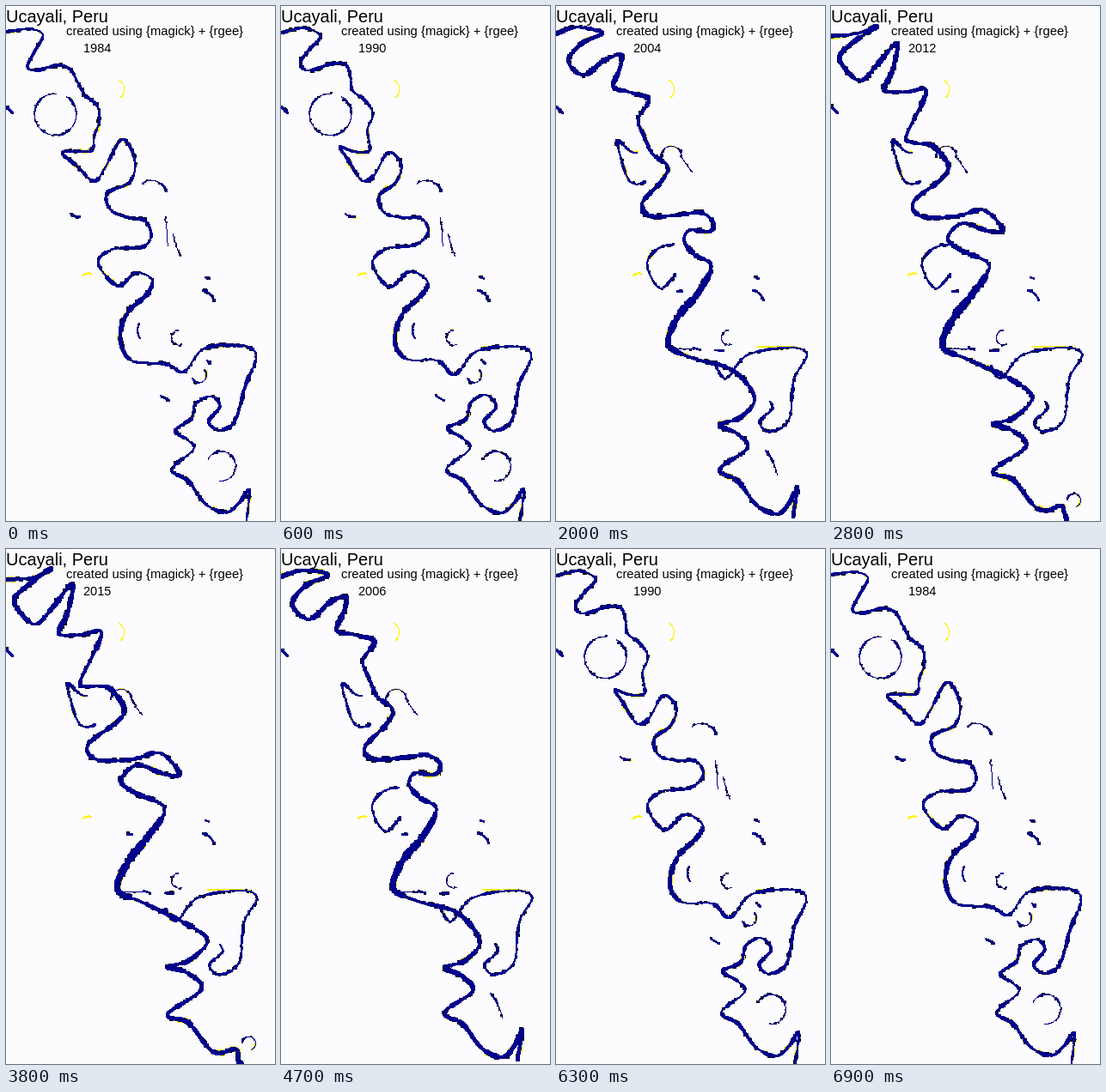
An HTML page with a canvas for the animation above (7 s loop, 313x600 px).

```html
<!DOCTYPE html>
<html lang="en">
<head>
<meta charset="utf-8">
<title>Ucayali, Peru</title>
<style>
html, body { margin: 0; width: 313px; height: 600px; overflow: hidden; background: #fcfcff; }
canvas, svg { position: absolute; left: 0; top: 0; }
text { font-family: "Liberation Sans", Arial, sans-serif; fill: #000; }
</style>
</head>
<body>
<canvas id="map" width="313" height="600"></canvas>
<svg width="313" height="600">
  <text x="0" y="19" font-size="20">Ucayali, Peru</text>
  <text x="70" y="34" font-size="14.8">created using {magick} + {rgee}</text>
  <text id="year" x="90" y="54" font-size="14.6">1984</text>
</svg>
<script>
const FIRST = 1984, LAST = 2018, STEP = 100;
const NAVY = '#00008b', YELLOW = '#fff200', BLACK = '#000020';
const ctx = document.getElementById('map').getContext('2d');
const label = document.getElementById('year');

// Bends of each reach, north to south. Equal counts drift; a change of count is a cutoff.
const reaches = [
  {
    1984: '0,30 28,27 43,34 32,55 25,71 36,75 60,69 75,74 84,90 92,104 106,116 108,136 103,150',
    1997: '0,33 25,24 49,36 33,47 19,62 28,76 55,66 76,62 77,78 73,92 88,103 106,114 98,138',
    2006: '0,32 25,25 55,30 30,42 13,64 33,82 57,62 76,56 72,76 65,95 90,101 109,108 95,130',
    2012: '0,35 30,32 53,24 25,43 10,62 33,87 54,68 77,43 72,74 62,98 88,100 111,100 88,150'
  }, {
    1984: '100,168 82,169 65,171 82,186 102,204 115,189 135,155 150,180',
    1997: '106,169 88,170 72,156 74,172 85,203 101,206 112,189 128,189',
    2006: '103,152 112,172 130,187',
    2012: '95,159 118,163 136,185'
  }, {
    1984: '144,205 118,218 122,238 145,247 162,250 169,268',
    1997: '121,207 110,224 118,244 140,246 165,244 174,258',
    2006: '122,205 98,230 105,244 135,244 170,240 186,252',
    2012: '129,201 96,228 105,245 145,245 178,238 200,261'
  }, {
    1984: '158,281 125,283 107,299 130,326 151,311 170,319',
    1997: '152,276 120,282 106,302 122,329 147,307 170,322',
    2006: '178,263 156,261 149,274 162,290 181,303',
    2012: '182,262 153,253 136,270 150,284 184,302'
  }, {
    wide: 1.4,
    1984: '164,336 141,358 133,388',
    2012: '165,335 142,364 130,397'
  }, {
    1984: '146,413 186,417 207,426 231,399 275,396 291,408 278,444 266,484 248,494 236,484 249,466 238,455 220,464 216,480 197,495',
    1997: '146,409 178,409 197,434 222,407 270,398 292,406 277,435 271,482 248,496 237,484 252,468 238,451 221,461 214,483 190,488',
    2006: '158,410 205,424 231,456 215,479 190,488',
    2012: '160,412 213,437 234,457 212,480 188,487'
  }, {
    1984: '212,506 218,517 193,540 212,553 232,580 256,590 272,578 283,564 280,600',
    2006: '210,497 223,515 190,540 212,554 234,582 258,592 272,578 281,560 275,595',
    2012: '210,494 227,513 188,542 212,552 235,581 250,588 268,582 272,592 275,600'
  }
];

// Lakes as arcs: x, y, length, heading, turn (degrees)
const lakes = [
  { from: 1984, to: 1990, arcs: [[58, 102, 140, 180, -330], [158, 207, 36, -35, 110], [185, 246, 34, 80, 10],
    [194, 265, 28, 75, -5], [155, 370, 18, 115, -60], [180, 454, 11, 30, 0], [235, 528, 75, -60, 250], [217, 434, 30, 60, -200]] },
  { from: 1984, to: 2001, arcs: [[75, 242, 12, 45, -60], [234, 413, 5, 45, 0]] },
  { from: 1984, to: 2018, arcs: [[229, 331, 18, 15, 60], [200, 378, 30, 170, -200], [232, 316, 5, 20, 0], [0, 117, 11, 45, 0]] },
  { from: 1991, to: 2018, arcs: [[122, 175, 38, -85, 180], [145, 174, 24, 60, -10], [141, 332, 6, 0, 0]] },
  { from: 1991, to: 2009, arcs: [[244, 518, 32, 50, 30]] },
  { from: 2002, to: 2018, arcs: [[160, 398, 8, 20, 0], [185, 401, 10, 0, 0], [133, 400, 28, -5, 10]] },
  { from: 2010, to: 2018, arcs: [[275, 575, 34, -80, 250]] },
  { from: 1984, to: 2018, color: YELLOW, arcs: [[131, 86, 24, 30, 110], [90, 314, 10, -40, 60], [235, 397, 50, -2, 5]] }
];

const mix = (a, b, t) => a + (b - a) * t;
const mixPoint = (p, q, t) => p.map((v, i) => mix(v, q[i], t));
const clamp = t => Math.max(0, Math.min(1, t));

function hash(a, b, c) {
  let n = Math.imul(a, 374761393) ^ Math.imul(b, 668265263) ^ Math.imul(c + 7, 1442695041);
  n = Math.imul(n ^ n >>> 13, 1274126177);
  n = Math.imul(n ^ n >>> 15, 739982445);
  return ((n ^ n >>> 16) >>> 0) / 4294967296;
}

// Catmull-Rom curve; points are [x, y, width]
function smooth(p) {
  const out = [p[0]];
  for (let i = 0; i < p.length - 1; i++) {
    const a = p[i - 1] || p[i], b = p[i], c = p[i + 1], d = p[i + 2] || c;
    for (let k = 1; k <= 10; k++) {
      const t = k / 10;
      out.push(b.map((v, j) => v + t / 2 * (c[j] - a[j] +
        t * (2 * a[j] - 5 * v + 4 * c[j] - d[j] + t * (3 * (v - c[j]) + d[j] - a[j])))));
    }
  }
  return out;
}

function arc([x, y, length, heading, turn]) {
  const w = length > 20 ? 1.3 : 2.2, pts = [[x, y, w]];
  for (let i = 0; i < length; i++) {
    const a = (heading + turn * i / length) * Math.PI / 180;
    pts.push([x += Math.cos(a), y += Math.sin(a), w]);
  }
  return pts;
}

const parse = (text, w) => text.split(' ').map(p => [...p.split(',').map(Number), w]);

const courses = reaches.map(({ wide = 1, ...states }) =>
  Object.entries(states).map(([year, text]) => ({ year: +year, pts: parse(text, wide) })));

function bends(states, year) {
  let k = 0;
  while (k < states.length - 2 && states[k + 1].year <= year) k++;
  const a = states[k], b = states[k + 1];
  let t = (year - a.year) / (b.year - a.year);
  if (a.pts.length !== b.pts.length) return (t < .5 ? a : b).pts;
  if (t > 1) t = 1 + (t - 1) / 3;
  return a.pts.map((p, i) => mixPoint(p, b.pts[i], t));
}

// A cut-off bend stays as a narrow lake with silted ends; larger ones last longer.
function oxbow(a, b) {
  const n = a.pts.length, from = Math.ceil((a.year + b.year) / 2);
  const line = smooth(a.pts.map(([x, y]) => [x, y, 2.2]));
  return { from, to: from + (n - 4) * 5, pts: line.slice(line.length * .1, line.length * .75) };
}

const waters = lakes.flatMap(({ arcs, ...era }) => arcs.map(a => ({ ...era, pts: arc(a) })));
for (const states of courses)
  states.slice(1).forEach((b, i) => {
    if (states[i].pts.length > b.pts.length) waters.push(oxbow(states[i], b));
  });

function walk(pts, visit) {
  for (let i = 1; i < pts.length; i++) {
    const a = pts[i - 1], b = pts[i];
    const n = Math.ceil(Math.hypot(b[0] - a[0], b[1] - a[1]) / .8);
    for (let k = 0; k < n; k++) visit(...mixPoint(a, b, k / n));
  }
}

function square(x, y, s, color) {
  ctx.fillStyle = color;
  ctx.fillRect(Math.round(x - s / 2), Math.round(y - s / 2), s, s);
}

const breadth = (x, y, w) => Math.max(1, Math.round(w * (.7 + .6 * hash(x / 9 | 0, y / 9 | 0, 1))));

function bank(pts, year) {
  walk(pts, (x, y, w) => {
    const px = Math.round(x), py = Math.round(y);
    if (hash(px, py, year) > .2) return;
    const dry = hash(x / 14 | 0, y / 14 | 0, 3) < .13;
    square(x + hash(px, py, 5) * 2 - 1, y + hash(px, py, 6) * 2 - 1, breadth(x, y, w) + 1, dry ? YELLOW : BLACK);
  });
}

const flow = (pts, color = NAVY) => walk(pts, (x, y, w) => square(x, y, breadth(x, y, w), color));

function draw(year) {
  const width = 2.9 + 1.1 * clamp((year - 1997) / 9);
  const river = smooth(courses.flatMap(states => bends(states, year)).map(([x, y, w]) => [x, y, w * width]));
  const seen = waters.filter(l => year >= l.from && year <= l.to);
  ctx.fillStyle = '#fcfcff';
  ctx.fillRect(0, 0, 313, 600);
  bank(river, year);
  seen.forEach(l => l.color || bank(l.pts, year));
  seen.forEach(l => flow(l.pts, l.color));
  flow(river);
  label.textContent = year;
}

let shown;
function tick() {
  const span = LAST - FIRST + 1;
  const i = Math.floor(performance.now() / STEP) % (2 * span);
  const year = FIRST + Math.min(i, 2 * span - 1 - i);
  if (year !== shown) draw(shown = year);
  requestAnimationFrame(tick);
}
tick();
</script>
</body>
</html>
```
